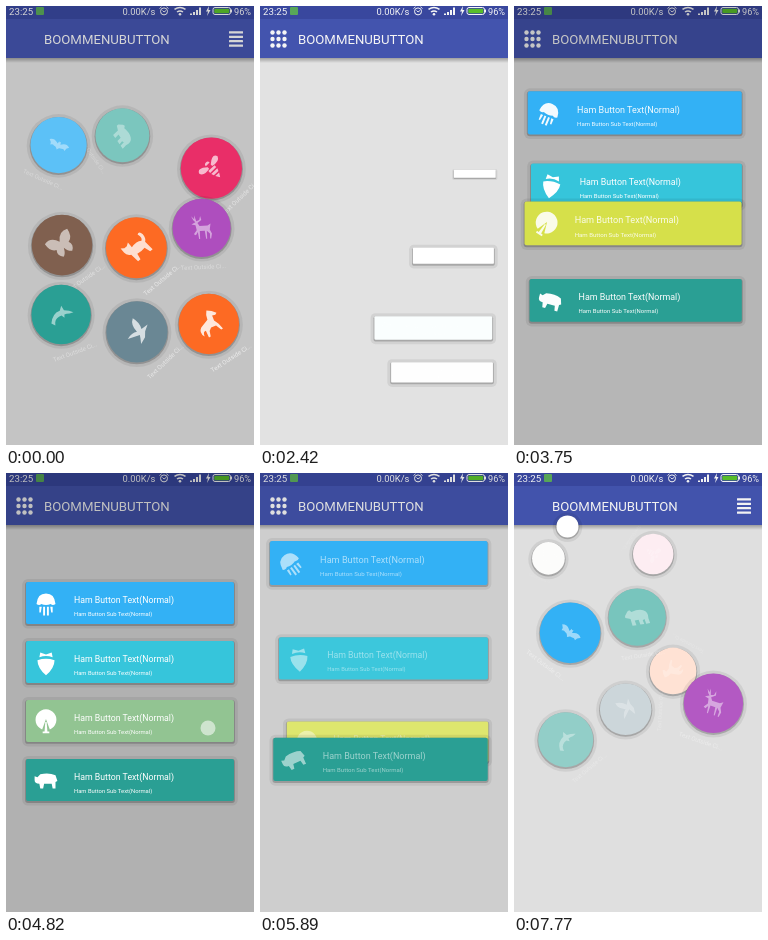
Write an HTML page that moves like this. It is 248 by 439 pixels and loops after 8 s.

```html
<!DOCTYPE html>
<html lang="en">
<head>
<meta charset="utf-8">
<title>BoomMenuButton</title>
<style>
  html, body { margin: 0; width: 100%; height: 100%; overflow: hidden; background: #ebebeb; }
  svg { display: block; font-family: Roboto, sans-serif; }
</style>
</head>
<body>
<svg id="stage" width="248" height="439" viewBox="0 0 248 439">
  <defs>
    <linearGradient id="drop" x2="0" y2="1">
      <stop stop-opacity=".3"/><stop offset="1" stop-opacity="0"/>
    </linearGradient>
  </defs>
  <rect width="248" height="439" fill="#ebebeb"/>
  <rect y="52" width="248" height="5" fill="url(#drop)"/>
  <rect width="248" height="52" fill="#4657b5"/>
  <rect width="248" height="13" fill="#3b4aa4"/>
  <g fill="#fff">
    <text x="3" y="8.6" font-size="9.7">23:25</text>
    <text x="116.5" y="8.6" font-size="9.4">0.00K/s</text>
    <text x="228" y="8.6" font-size="9.2">96%</text>
    <text x="38" y="38.2" font-size="13.2">BOOMMENUBUTTON</text>
    <path d="M184,9V7.5h2V9ZM187,9V6h2V9ZM190,9V4h2V9ZM193,9V1.5h2V9Z"/>
    <path d="M203,0L200,5.5H202L201,10 204.5,4H202.5Z"/>
    <circle cx="174" cy="8.2" r="1.3"/>
    <g fill="none" stroke="#fff">
      <circle cx="158" cy="5.4" r="3.5"/>
      <path d="M156.5,4.5L158,6 160,4.5M153.5,2.5L155.5,.8M160.5,.8L162.5,2.5" stroke-width=".9"/>
      <path d="M168.5,3.4Q174,-.6 179.5,3.4M171,6Q174,3.8 177,6" stroke-width="1.5"/>
      <rect x="207" y="1.5" width="17.5" height="7" rx="2"/>
    </g>
    <rect x="224.5" y="3.5" width="1.5" height="3"/>
  </g>
  <rect x="208.3" y="2.7" width="15" height="4.6" rx="1" fill="#5cc62c"/>
  <rect x="30" y="1" width="8" height="8" rx="1" fill="#5cae5c"/>
  <g id="parked" fill="#fff"></g>
  <rect id="dim" width="248" height="439"/>
  <g id="flying"></g>
  <circle id="touch" fill="#fff" fill-opacity=".55" r="7.5"/>
</svg>
<script>
const LOOP = 8000, STEP = 268, SPAN = 1800;
const $ = id => document.getElementById(id);
const clamp = x => Math.max(0, Math.min(1, x));
const lerp = (a, b, k) => a + (b - a) * k;

function set(node, attrs) {
  for (const k in attrs) node.setAttribute(k, attrs[k]);
  return node;
}
function add(parent, tag, attrs = {}, text = '') {
  const node = set(document.createElementNS('http://www.w3.org/2000/svg', tag), attrs);
  node.textContent = text;
  return parent.appendChild(node);
}

// Listed back to front: grid cell, colour, closing phase, opening phase, icon
const circles = [
  [4, '#fd6a23', .302, .918, 'M-12,-9L-9,-7 -6,-7 -3,-9V-3Q4,-5 8,-2Q11,-4 9,-9Q12,-11 13,-6Q13,-1 10,1L11,11H8L6,5Q1,6 -3,5L-4,11H-7L-8,2Q-12,0 -12,-4Z'],
  [3, '#80604f', .47, .857, 'M0,-4Q5,-13 13,-10Q13,-1 7,1Q10,6 5,10Q2,9 0,3Q-2,9 -5,10Q-10,6 -7,1Q-13,-1 -13,-10Q-5,-13 0,-4Z'],
  [2, '#e92e68', .398, .803, 'M-2,-3Q-10,-10 -12,-4Q-10,1 -2,-1ZM2,-3Q10,-10 12,-4Q10,1 2,-1ZM-2.5,-5a2.5,2.5 0 1 1 5,0ZM-4,0H4V2.5H-4ZM-4,4H4L3,6.5H-3ZM-2.5,8H2.5L0,12Z'],
  [8, '#fd6a23', .253, .75, 'M5,-12L9,-9 12,-5 10,-4 7,-5 6,0 8,5 9,11H7L5,5 0,4 -3,6 -5,11H-7L-6,4Q-9,3 -10,8Q-13,2 -8,-1Q-2,-3 1,-4Q2,-9 5,-12Z'],
  [7, '#6a8794', .351, .699, 'M0,4L-11,-1Q-4,-3 0,0Q0,-9 6,-12Q8,-5 5,1L12,2 6,5 2,9 -5,11 -2,7Z'],
  [6, '#2a9f94', .52, .652, 'M-12,5Q-8,-4 0,-4L3,-8 4,-3Q9,-1 12,2L8,2Q5,1 3,1L2,4 0,1Q-6,1 -8,5L-9,8Z'],
  [1, '#39aa9e', .645, .613, 'M-12,-3L-9,-7 -7,-8 -5,-6Q2,-8 7,-6Q12,-4 11,3L12,8H8L7,3 5,4 6,8H2L1,3H-3L-2,8H-6L-7,1Q-9,0 -12,-1Z'],
  [5, '#ab47bc', .56, .568, 'M-10,-4L-6,-6 -8,-8 -10,-12 -7,-9 -7,-13 -5,-7 -2,-8 -1,-12 0,-8 -4,-5 -2,-2 6,-2 9,-4 8,2 10,6 9,11H8L8,6 5,3 5,11H4L3,3 -2,3 -2,11H-3L-4,4 -6,7 -8,6 -5,2 -6,-3Z'],
  [0, '#33b1f5', .605, .525, 'M-11,-2Q-7,-5 -3,-2L-1.5,-1 -1,-4 0,-3 1,-4 1.5,-1 3,-2Q7,-5 11,-2Q8,0 8,3Q6,1 4,2.5Q2,2 0,5Q-2,2 -4,2.5Q-6,1 -8,3Q-8,0 -11,-2Z']
];
const hams = [
  [0, '#33b1f5', .465, .467, 'M-10,0Q-9,-11 0,-11Q9,-11 10,0Q7,2 5,0Q0,2 -5,0Q-7,2 -10,0ZM-7,3h2.5l-1,6h-1.5ZM-3,3h2v9h-2ZM1,3h2v9h-2ZM4.5,3h2.5v6h-1.5Z'],
  [1, '#36c5db', .558, .408, 'M-9,-3Q0,-6 9,-3Q9,5 0,13Q-9,5 -9,-3ZM-7,-6L-6,-11 0,-9 6,-11 7,-6Q0,-9 -7,-6Z'],
  [2, '#d6e04a', .605, .52, 'M-4,8A11,11 0 1 1 4,8L0,-3ZM-.7,0h1.4l.8,10h2v2h-7v-2h2Z'],
  [3, '#2a9f94', .51, .435, 'M-12,-5L-9,-4 -6,-7Q3,-9 10,-6L12,0 10,1 10,8H7L6,3H-2L-3,8H-6L-7,3Q-12,3 -12,-1Z']
];

// The body is a rounded rect, so discs and bars share one builder
function build([cell, color, close, open, icon], round) {
  const g = add($('flying'), 'g');
  const it = { cell, color, close, open, round, g };
  it.halo = add(g, 'rect', { fill: '#000', 'fill-opacity': .07 });
  it.edge = add(g, 'rect', { fill: '#000', 'fill-opacity': .2 });
  it.body = add(g, 'rect');
  it.face = add(g, 'g', { fill: '#fff' });
  it.icon = add(it.face, 'path', { d: icon });
  if (round) {
    const col = cell % 3, row = Math.floor(cell / 3);
    it.from = [12.5 + 6 * col, 26.5 + 6.5 * row];
    it.to = [54 + 70.5 * col, 147 + 73.5 * row];
    it.size = [[4.4, 58], [4.4, 58]];
    add(it.face, 'text', { y: 41, 'font-size': 6, 'text-anchor': 'middle', 'fill-opacity': .8 }, 'Text Outside Ci...');
  } else {
    it.from = [230, 26.4 + 4.4 * cell];
    it.to = [124, 130 + 59 * cell];
    it.size = [[14, 208], [2.2, 42]];
    add(it.face, 'text', { x: -56, y: 0, 'font-size': 8.75 }, 'Ham Button Text(Normal)');
    add(it.face, 'text', { x: -56, y: 12.7, 'font-size': 5.85 }, 'Ham Button Sub Text(Normal)');
  }
  const [w, h] = it.size.map(s => s[0]);
  it.piece = add($('parked'), 'rect', {
    x: it.from[0] - w / 2, y: it.from[1] - h / 2, width: w, height: h, rx: round ? w / 2 : .3
  });
  return it;
}
const items = [...circles.map(c => build(c, true)), ...hams.map(h => build(h, false))];

function box(node, w, h, grow, rx, dy = 0) {
  set(node, { x: -w / 2 - grow, y: -h / 2 - grow + dy, width: w + 2 * grow, height: h + 2 * grow, rx });
}
function whiten(hex, k) {
  const part = i => Math.round(lerp(parseInt(hex.slice(i, i + 2), 16), 255, k));
  return `rgb(${part(1)},${part(3)},${part(5)})`;
}

function place(it, t, pressed) {
  const opening = it.round ? t > 4000 : t < 4500;
  // away: 0 at rest in the open menu, 1 back inside the icon
  const away = clamp(opening
    ? it.open - (t - (it.round ? 7772 : 3216)) / SPAN
    : it.close + (t - (it.round ? 0 : 5896)) / SPAN);
  const parked = away >= 1;
  it.piece.setAttribute('visibility', parked ? 'visible' : 'hidden');
  it.g.setAttribute('visibility', parked ? 'hidden' : 'visible');
  if (parked) return;

  const c = opening ? 1.5 : 1.3;
  const back = (c + 1) * away ** 3 - c * away ** 2;
  const p = 1 - back;
  const x = lerp(it.from[0], it.to[0], p);
  const sag = opening ? 830 : 862;
  const y = it.round
    ? lerp(it.from[1], it.to[1], p * p)
    : lerp(it.from[1], it.to[1], p) + sag * p * (1 - p);
  const [w, h] = it.size.map(s => lerp(s[0], s[1], p));
  const pale = opening
    ? 1 - (1 - clamp((away - .55) / .36)) ** 2
    : 1 - (1 - clamp((away - .55) / .4)) ** 1.5;
  const turn = (opening ? -720 : 720) * back;
  const rx = it.round ? w / 2 : 2 * p;
  const shade = Math.min(1, 3 * p);

  it.g.setAttribute('transform', `translate(${x} ${y})`);
  box(it.halo, w, h, 3.8 * shade, rx + 3.8 * shade, .8);
  box(it.edge, w, h, .9 * shade, rx + .9 * shade, 1);
  box(it.body, w, h, 0, rx);
  it.body.setAttribute('fill', pressed ? '#92c492' : whiten(it.color, pale));
  const zoom = w / it.size[0][1];
  set(it.face, {
    transform: it.round ? `rotate(${turn}) scale(${zoom})` : `scale(${zoom})`,
    opacity: clamp(1.15 - 1.2 * away)
  });
  if (!it.round) it.icon.setAttribute('transform', `translate(-84 1) rotate(${turn}) scale(.95)`);
}

const shades = [[0, .166], [1000, 0], [2140, 0], [3216, .15], [3900, .25], [4800, .25],
  [5896, .125], [6420, 0], [6950, 0], [7772, .05], [8000, .09]];
function dimAt(t) {
  const i = shades.findIndex(s => s[0] > t);
  const [a, b] = [shades[i - 1], shades[i]];
  return lerp(a[1], b[1], (t - a[0]) / (b[0] - a[0]));
}

function draw(now) {
  // Each picture is held for about a quarter second
  const step = Math.floor((now % LOOP + 9) / STEP);
  const t = step * STEP;
  const tapMenu = step === 8, tapItem = step === 18;
  $('dim').setAttribute('fill-opacity', dimAt(t));
  for (const it of items) place(it, t, tapItem && !it.round && it.cell === 2);
  set($('touch'), {
    cx: tapMenu ? 231 : 202, cy: tapMenu ? 29 : 255,
    visibility: tapMenu || tapItem ? 'visible' : 'hidden'
  });
}

const start = performance.now();
function tick() {
  draw(performance.now() - start);
  requestAnimationFrame(tick);
}
tick();
</script>
</body>
</html>
```
